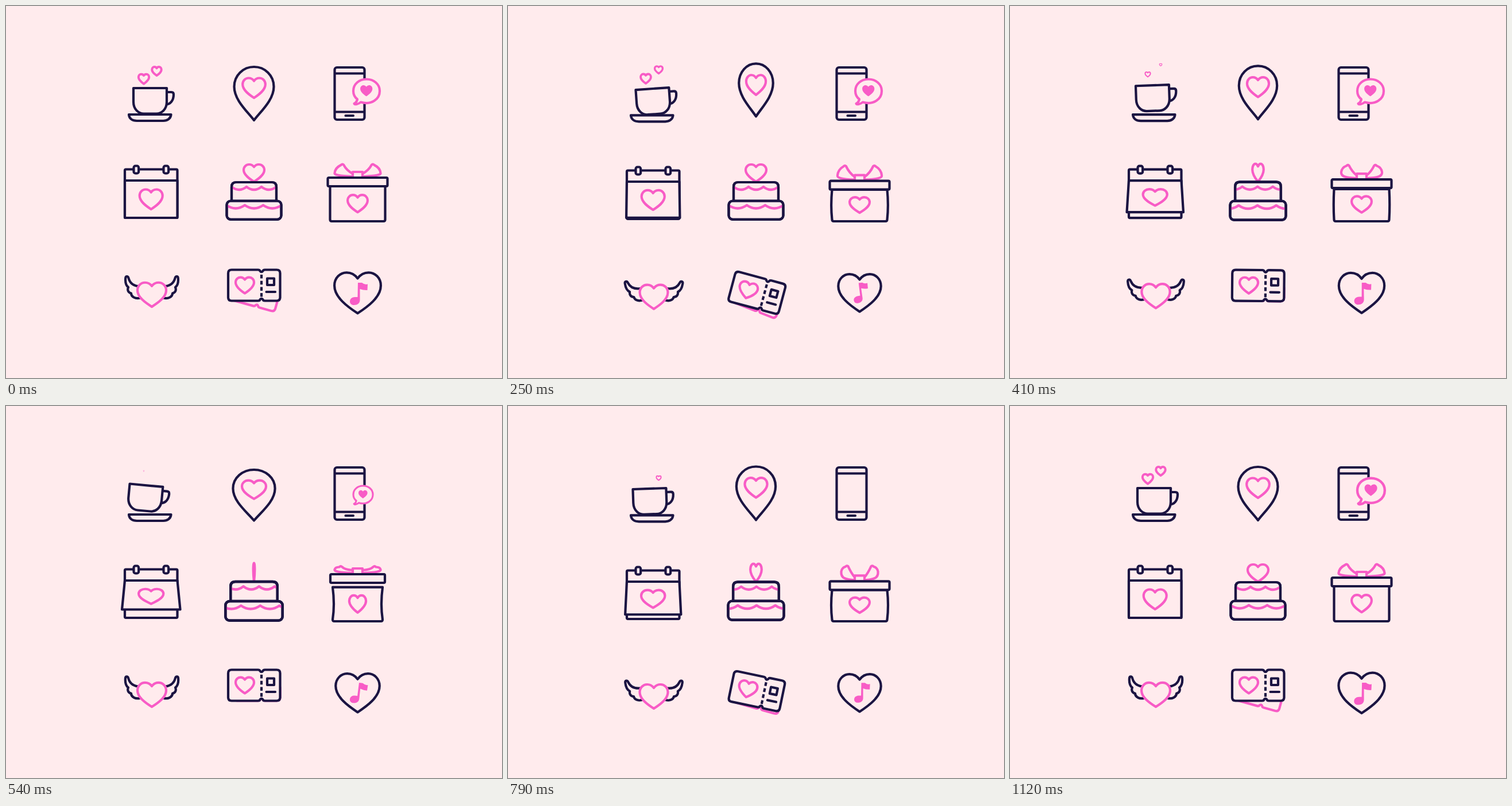
Recreate the animation shown at these times as an HTML page. Size 864x648 px, loop 1160 ms.

```html
<!DOCTYPE html>
<html lang="en">
<head>
<meta charset="utf-8">
<title>Love icons</title>
<style>
  html, body { margin: 0; width: 100%; height: 100%; overflow: hidden; background: #ffebed; }
  svg { display: block; width: 100vw; height: 100vh; }
  #stage { fill: #ffebed; stroke: #1b1442; stroke-width: 4.2; stroke-linejoin: round; stroke-linecap: round; }
  .pink { stroke: #f85cc6; }
  .solid { fill: #f85cc6; stroke: none; }
  .line { fill: none; }
</style>
</head>
<body>
<svg viewBox="0 0 864 648">
  <defs>
    <clipPath id="upper"><rect x="393" y="307" width="78" height="33"/></clipPath>
    <clipPath id="lower"><rect x="384.5" y="339" width="95" height="33"/></clipPath>
  </defs>
  <g id="stage"></g>
</svg>
<script>
const LOOP = 1160, STEPS = 28;
const stage = document.getElementById('stage');
let now = 0;

// Timing is counted in steps of the loop.
const linear = (from, to) => Math.min(1, Math.max(0, (now - from) / (to - from)));
const ramp = (from, to) => {
  const u = linear(from, to);
  return u * u * (3 - 2 * u);
};
const pulse = (from, peak, to) => ramp(from, peak) - ramp(peak, to);

const path = (d, cls = '', extra = '') => `<path class="${cls}" d="${d}" ${extra}/>`;
const group = (transform, body) => `<g transform="${transform}">${body}</g>`;
const rect = (x, y, w, h, r, cls = '') =>
  `<rect class="${cls}" x="${x}" y="${y}" width="${w}" height="${h}" rx="${r}"/>`;

// Heart 40 wide and 34.5 high at scale 1; strokes keep their weight.
function heart(x, y, sx, sy, cls = 'pink', extra = '') {
  const p = (a, b) => `${x + a * sx} ${y + b * sy} `;
  return path('M' + p(0, 17.5)
    + 'C' + p(-8.5, 12) + p(-20, 4) + p(-20, -6)
    + 'C' + p(-20, -12.5) + p(-15, -17) + p(-9.5, -17)
    + 'C' + p(-6, -17) + p(-2.5, -15.5) + p(0, -12)
    + 'C' + p(2.5, -15.5) + p(6, -17) + p(9.5, -17)
    + 'C' + p(15, -17) + p(20, -12.5) + p(20, -6)
    + 'C' + p(20, 4) + p(8.5, 12) + p(0, 17.5) + 'Z', cls, extra);
}

// Rises and shrinks away, then grows back from below.
function steam(x, y, scale, lag) {
  const away = ramp(lag + 5, lag + 15), back = ramp(lag + 16, lag + 25);
  const size = away < 1 ? 1 - away : back;
  if (size < .02) return '';
  const top = away < 1 ? y - 15.5 * away : y + 24 * (1 - back);
  return heart(x, top, scale * size, scale * size * 1.06, 'pink', `style="stroke-width:${4 * size}"`);
}

function cup() {
  const dip = pulse(2, 6, 11) + pulse(15, 19, 23);
  const turn = 5.5 * pulse(10, 13, 18) - 4 * pulse(2, 6, 14) - 2 * pulse(16, 19, 22);
  const dx = 2 * pulse(2, 6, 10) - 8.7 * pulse(8.5, 13, 24);
  const dy = dip - 6 * pulse(6, 11.5, 17);
  const body = path('M280 150H288Q292 150 292 154C292 165 286 171.5 278 171.5', 'line')
    + path('M222 143H280V167C280 180 271 187.5 262 187.5H240C231 187.5 222 180 222 167Z');
  const saucer = path('M214 189H287.5C287 196 281 200 274 200H228C220 200 214.5 196 214 189Z');
  return steam(240, 127, .46, 0) + steam(262.5, 113.5, .41, -1.5)
    + group(`translate(${dx} ${dy}) rotate(${turn} 251 166)`, body)
    + group(`translate(0 ${1.3 * dip})`, saucer);
}

function pin() {
  const hop = pulse(1, 5, 12.5) + .4 * pulse(14, 16.5, 20);
  const squash = pulse(10, 13, 17);
  const wide = 1 - .145 * hop + .06 * squash, w = 34.5 * wide;
  const top = 106 - 6 * hop + 5 * squash;
  const tip = 199 - 7 * hop + .5 * squash;
  const h = tip - top, mid = top + h * .37;
  const side = s => `M432 ${tip}C${432 + s * w * .32} ${tip - h * .16} ${432 + s * w} ${tip - h * .376} ${432 + s * w} ${mid}`
    + `C${432 + s * w} ${top + h * .16} ${432 + s * w * .55} ${top} 432 ${top}`;
  return path(side(-1) + side(1), 'line')
    + heart(432, 142.5 - 5.5 * hop + 3 * squash, .99 * wide, 1 - .07 * squash);
}

function phone() {
  const turn = 3.7 * Math.sin(3 * Math.PI * linear(20, 26));
  const size = 1 - ramp(11.5, 16) + ramp(23.5, 26.5) + .04 * pulse(25, 27, 28);
  const body = rect(572.5, 107, 52, 91, 4)
    + path('M573 117.5H624M573 184.5H624M591.5 191H605', 'line');
  const bubble = path('M612 162.5C611 167 609 169 606.5 170C607 172.5 614 171 618 167.5'
      + 'C637 173 651 162 651 148C651 136 640.5 127.5 628 127.5C615 127.5 605 136 605 148'
      + 'C605 154 607.5 159 612 162.5Z', 'pink')
    + heart(627.7, 147.5, .53, .56, 'solid');
  return group(`rotate(${turn} 598.5 152.5)`, body)
    + (size > .02 ? group(`translate(605 172) scale(${size}) translate(-605 -172)`, bubble) : '');
}

function calendar() {
  const dip = pulse(2, 6, 11) + pulse(15, 19, 24);
  const open = pulse(5, 13, 24);
  const flap = 369 + .5 * dip - 14.5 * open, out = 5 * open + .7 * dip;
  const ring = x => rect(x, 278.5, 8.6, 13, 3);
  const shift = `translate(0 ${2 * dip})`;
  return group(shift, rect(207, 284.5, 91.5, 84.5, 2))
    + path(`M207 ${304 + 2 * dip}H298.5L${298.5 + out} ${flap}H${207 - out}Z`)
    + group(shift, ring(222.5) + ring(274.5))
    + heart(252.7, 336.5 + 1.5 * dip - 5 * open, 1 + .08 * open, 1 - .25 * open);
}

function scallops(x0, x1, period, y, depth, shift) {
  let x = x0 - period + shift % period, d = `M${x} ${y}`;
  for (; x < x1; x += period) d += `Q${x + period / 2} ${y + depth} ${x + period} ${y}`;
  return path(d, 'pink line');
}

// The heart makes half a turn while the icing slides by two scallops.
function cake() {
  const u = linear(6, 23), side = Math.sin(Math.PI * u) ** 2;
  const top = 276 - 2.5 * side, sy = (306 - top) / 34.5;
  const tier = 'M393 339V315Q393 307 401 307H463Q471 307 471 315V339';
  const base = cls => rect(384.5, 339.5, 95, 32.3, 7, cls);
  const body = path(tier)
    + `<g clip-path="url(#upper)">${scallops(393, 471, 26, 315, 10, u * 52)}</g>`
    + path(tier, 'line') + base('')
    + `<g clip-path="url(#lower)">${scallops(384, 480, 32, 347, 11, u * 64)}</g>`
    + base('line');
  return heart(432, top + 17 * sy, .9 * (1 - side), sy)
    + group(`translate(432 330) scale(${1 + .05 * side}) translate(-432 -330)`, body);
}

function gift() {
  const crouch = pulse(2, 7, 13) + pulse(15, 19, 23);
  const squat = pulse(2, 7, 16) + pulse(15, 19, 23);
  const hop = pulse(10, 13, 17);
  const curl = .6 * pulse(4, 9.5, 13) + pulse(15, 19, 23);

  const lid = 299 + 6.3 * crouch - 6 * hop, lidW = 52 - 4.5 * hop;
  const top = 314 + 6.5 * squat, w = 48 - 4.5 * hop;
  const belly = w + 3 * crouch - 4 * hop, mid = (top + 375) / 2;
  const box = `M${-w} ${top}H${w}Q${belly} ${mid} ${w} 372Q${w} 375 ${w - 3} 375`
    + `H${3 - w}Q${-w} 375 ${-w} 372Q${-belly} ${mid} ${-w} ${top}Z`;

  const tx = 4.5 * curl - 27 - 3 * hop, ty = 9.5 * hop - 22.5 - 3.5 * crouch;
  const lx = 8 * curl - 40, ly = -8 - 9 * curl;
  const loop = path(`M-8.5 -7Q${tx + 8} ${ty / 2 - 1} ${tx + 2.5} ${ty}`
    + `Q${tx + .5} ${ty - 2} ${tx - 2} ${ty + .5}`
    + `Q${lx + 1} ${(ty + ly) / 2 - 2} ${lx} ${ly}`
    + `C${lx - 1} -5 ${lx + 8} -3 -8.5 -2`, 'pink');
  const bow = loop + group('scale(-1 1)', loop) + path('M-8.5 0V-10H8.5V0Z', 'pink');

  return group('translate(612.5 0)', path(box)
    + group(`translate(0 ${lid})`, bow + rect(-lidW, 0, lidW * 2, 15, 2))
    + heart(0, 344 + 2.7 * crouch + .7 * hop, .87 - .14 * hop, .87 - .1 * crouch));
}

function wings() {
  const flap = (1 - Math.cos(Math.PI * now / 7)) / 2;
  const wing = group(`translate(${-flap} 0) rotate(${-14 * flap} 231 492)`,
    path('M234 488.5C221 488 215.5 482 213.5 474C212.5 470 208.5 470 208.2 474'
      + 'C207.5 482 209 487 213 490C211 495 213 499 218 500.5C218 506 225 511 234 508.5'));
  return group(`translate(0 ${4 * flap})`,
    wing + group('translate(508 0) scale(-1 1)', wing)
    + heart(254, 502.5, 1.25 - .03 * flap, 1.22));
}

function tickets() {
  const swing = pulse(1, 6, 10.5) + .8 * pulse(14, 18.5, 24.5);
  const spread = 1 - ramp(1, 10) + ramp(16, 25);
  const lower = 'H439Q442 513.5 442.5 511.5Q445 508 447.5 511.5Q448 513.5 451 513.5'
    + 'H471.5Q477.5 513.5 477.5 507.5';
  const outline = `M393 513.5${lower}V465.5Q477.5 459.5 471.5 459.5H451Q448 459.5 447.5 461.5`
    + 'Q445 465 442.5 461.5Q442 459.5 439 459.5H393Q387 459.5 387 465.5V507.5Q387 513.5 393 513.5Z';
  const pose = (fan, body) => group(`translate(${1.5 * swing - fan} ${13 * swing + 8 * fan}) `
    + `rotate(${15 * swing + 15.5 * fan} 432 486.5)`, body);
  return pose(spread, path(`M402 513.5${lower}V490`, 'pink line'))
    + pose(0, path(outline)
      + path('M445 468V508', 'line', 'stroke-dasharray="6.5 4.2" stroke-linecap="butt"')
      + heart(416, 486.3, .8, .81)
      + rect(455, 474.5, 12, 11.5, 0) + path('M453.5 498H469', 'line'));
}

function music() {
  const beat = 1 - ramp(0, 5) + .8 * pulse(6, 10.5, 15) + ramp(23, 28);
  const s = .92 + .08 * beat;
  const turn = 6 * pulse(10, 13, 17) - 8 * pulse(1, 6, 11);
  const x = 614.5 + 2.5 * pulse(14, 20, 28), y = 499.5 + 2 * beat;
  const note = path('M613 482H620Q625 486 630 484.5L629.5 495Q623 495.5 616.5 493'
    + 'V512C616.5 518 612 521 606 521C602 521 599 518.5 599 514.5C599 510 603 507 608 507H612.5Z', 'solid');
  return heart(612.5, 499.3, 2.02 * s, 2.06 * s, '')
    + group(`translate(${x} ${y}) rotate(${turn}) scale(${.89 + .11 * beat}) translate(-614.5 -501.5)`, note);
}

const icons = [cup, pin, phone, calendar, cake, gift, wings, tickets, music];

function draw(step) {
  now = step;
  stage.innerHTML = icons.map(icon => icon()).join('');
}

const start = performance.now();
let shown = -1;
function tick() {
  const t = (performance.now() - start) % LOOP;
  const step = Math.min(STEPS - 1, Math.floor((t + 5) * STEPS / LOOP));
  if (step !== shown) draw(shown = step);
  requestAnimationFrame(tick);
}
tick();
</script>
</body>
</html>
```
